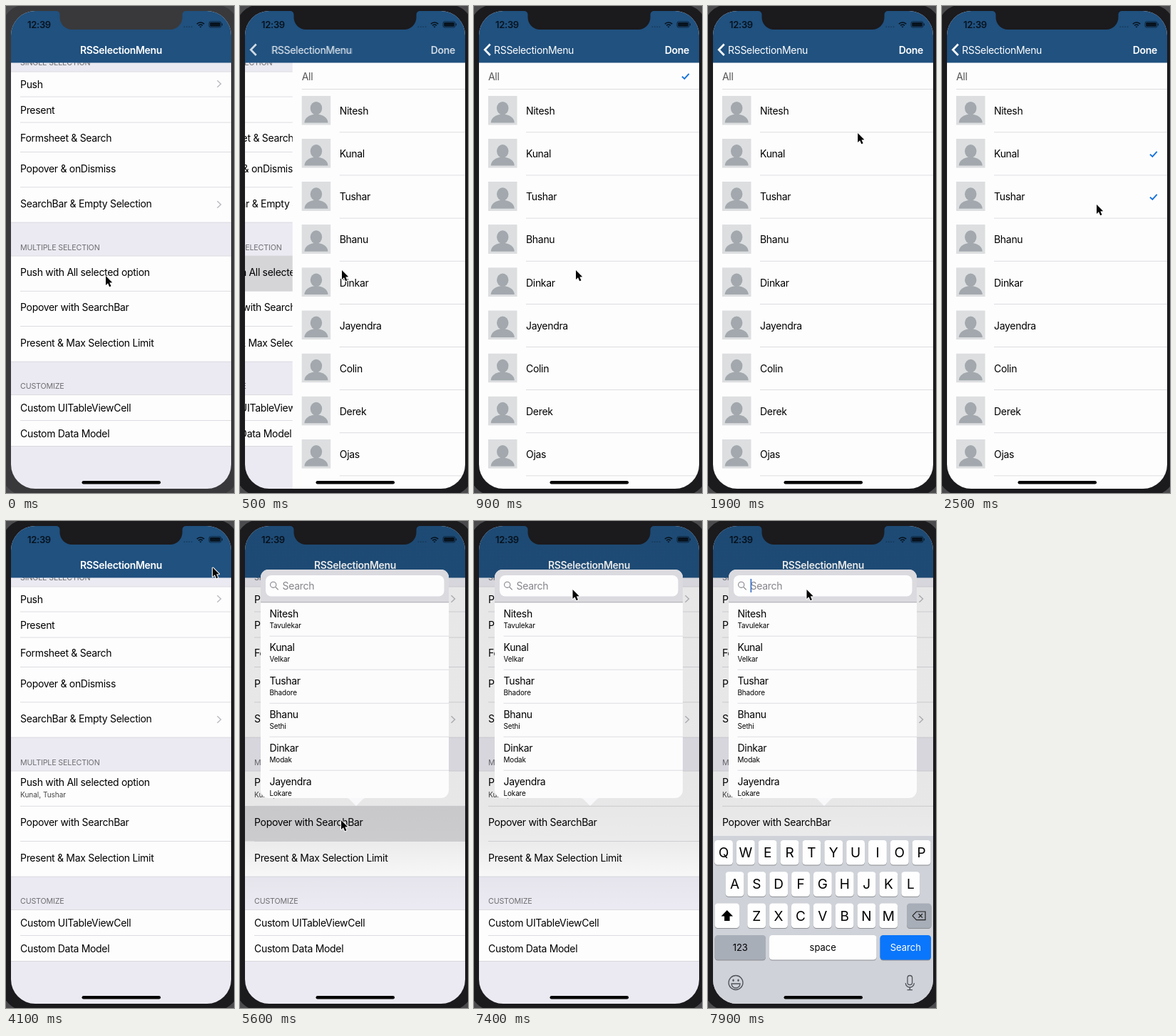
An HTML page with a canvas for the animation above (8000 ms loop, 320x682 px).

```html
<!DOCTYPE html>
<html lang="en">
<head>
<meta charset="utf-8">
<title>Selection menu demo</title>
<style>
html, body { margin: 0; width: 100%; height: 100%; overflow: hidden; background: #1b1a1d; }
canvas { display: block; width: 320px; height: 682px; }
</style>
</head>
<body>
<canvas id="stage"></canvas>
<script>
const W = 320, H = 682, LOOP = 8000, STEP = 100;
const SCREEN = { x: 7, y: 7, w: 309, h: 669 };
const NAV_BOTTOM = 79.5;
const FONT = 'Inter, Roboto, sans-serif';
const NAMES = ['Nitesh', 'Kunal', 'Tushar', 'Bhanu', 'Dinkar', 'Jayendra', 'Colin', 'Derek', 'Ojas'];
const SURNAMES = ['Tavulekar', 'Velkar', 'Bhadore', 'Sethi', 'Modak', 'Lokare'];

const canvas = document.getElementById('stage');
const ctx = canvas.getContext('2d');
const ratio = window.devicePixelRatio || 1;
canvas.width = W * ratio;
canvas.height = H * ratio;

const clamp = v => Math.min(1, Math.max(0, v));
const lerp = (a, b, u) => a + (b - a) * u;
const ramp = (t, start, end) => clamp((t - start) / (end - start));
const easeOut = u => 1 - (1 - u) ** 3;
const smooth = u => u * u * (3 - 2 * u);

function rect(x, y, w, h, color) {
  ctx.fillStyle = color;
  ctx.fillRect(x, y, w, h);
}

function rounded(x, y, w, h, r, color) {
  ctx.beginPath();
  ctx.roundRect(x, y, w, h, r);
  ctx.fillStyle = color;
  ctx.fill();
}

function stroke(points, color, width) {
  ctx.beginPath();
  points.forEach(([x, y]) => ctx.lineTo(x, y));
  ctx.strokeStyle = color;
  ctx.lineWidth = width;
  ctx.stroke();
}

function polygon(points, color) {
  ctx.beginPath();
  points.forEach(([x, y]) => ctx.lineTo(x, y));
  ctx.closePath();
  ctx.fillStyle = color;
  ctx.fill();
}

// y is the middle of the capital letters.
function label(str, x, y, { size = 14, color = '#000', weight = 400, align = 'left', track = -0.022 } = {}) {
  ctx.font = `${weight} ${size}px ${FONT}`;
  ctx.letterSpacing = `${size * track}px`;
  ctx.textAlign = align;
  ctx.fillStyle = color;
  ctx.fillText(str, x, y + size * 0.36);
}

function faded(alpha, draw) {
  if (alpha <= 0) return;
  ctx.save();
  ctx.globalAlpha *= alpha;
  draw();
  ctx.restore();
}

function shifted(dx, dy, draw) {
  ctx.save();
  ctx.translate(dx, dy);
  draw();
  ctx.restore();
}

const separator = (x, y, end = 316) => rect(x, y - 0.3, end - x, 0.7, '#d0cfd4');
const chevron = y => stroke([[296.5, y - 4.7], [301.5, y], [296.5, y + 4.7]], '#bcbcc2', 1.5);
const check = y => stroke([[292, y + 0.3], [295.4, y + 3.5], [301.7, y - 3.7]], '#1673dc', 1.9);

function section(title, y, edges, rows) {
  label(title, 20, y, { size: 10.7, color: '#6d6d72', track: -0.014 });
  const top = edges[0], bottom = edges[edges.length - 1];
  rect(7, top, 309, bottom - top, '#fdfdfe');
  edges.forEach((edge, i) => separator(i === 0 || edge === bottom ? 7 : 20, edge));
  rows.forEach(draw => draw());
}

function drawMenu(t) {
  const row = (str, y) => () => label(str, 20, y);
  const picked = t >= 3500;
  rect(7, 7, 309, 669, '#ebeaf2');

  section('SINGLE SELECTION', 79, [92, 127, 163, 204.3, 253.8, 303], [
    row('Push', 109.5), row('Present', 145.5), row('Formsheet & Search', 184.5),
    row('Popover & onDismiss', 227.5), row('SearchBar & Empty Selection', 277)
  ]);
  chevron(109);
  chevron(278);

  section('MULTIPLE SELECTION', 338, [350, 399.2, 448.5, 498], []);
  const pushGlow = t < 2000 ? ramp(t, 200, 300) : 1 - ramp(t, 3600, 4000);
  const popGlow = ramp(t, 5250, 5350) * (1 - ramp(t, 5700, 6000));
  faded(pushGlow, () => rect(7, 350, 309, 49, '#d5d5d8'));
  faded(popGlow, () => rect(7, 399, 309, 49.5, '#dbdbde'));
  label('Push with All selected option', 20, picked ? 366 : 372.5);
  if (picked) label(`${NAMES[1]}, ${NAMES[2]}`, 20, 383, { size: 10, color: '#444', track: 0 });
  label('Popover with SearchBar', 20, 422);
  label('Present & Max Selection Limit', 20, 471.5);

  section('CUSTOMIZE', 532.5, [544.3, 580.3, 616.3], [
    row('Custom UITableViewCell', 562.5), row('Custom Data Model', 599)
  ]);
}

function avatar(x, y) {
  ctx.save();
  ctx.beginPath();
  ctx.rect(x, y, 41, 41);
  ctx.clip();
  rect(x, y, 41, 41, '#dcdee0');
  ctx.fillStyle = '#a2a8ad';
  ctx.beginPath();
  ctx.ellipse(x + 20.5, y + 17.5, 8.2, 9.3, 0, 0, Math.PI * 2);
  ctx.fill();
  ctx.beginPath();
  ctx.ellipse(x + 20.5, y + 37.7, 16.5, 12, 0, Math.PI, 0);
  ctx.fill();
  ctx.restore();
}

function drawList(t) {
  rect(7, 7, 309, 669, '#fdfdfe');
  label('All', 20, 98.5, { color: '#555' });
  if (t < 1600) check(98.5);
  separator(20, 116.5);
  NAMES.forEach((name, i) => {
    const y = 147 + i * 60.13;
    avatar(19.7, y - 21.3);
    label(name, 73, y);
    separator(73, y + 29.8);
  });
  if (t >= 2100) check(207.5);
  if (t >= 2500) check(267.5);
}

function drawNav(p) {
  const title = 'RSSelectionMenu';
  rect(7, 7, 309, NAV_BOTTOM - 7, '#20517f');
  faded(1 - p, () => label(title, lerp(161.5, 84, p), 61.5, { weight: 600, color: '#fff', align: 'center' }));
  faded(p, () => {
    stroke([[22.7, 53.5], [15.2, 61.2], [22.7, 69]], '#fff', 2.7);
    label(title, lerp(104, 28, p), 61.5, { color: '#fff' });
    label('Done', 302, 61.5, { weight: 600, color: '#fff', align: 'right' });
  });
}

function drawStatus() {
  const ink = '#07131f';
  label('12:39', 30, 26, { size: 13, weight: 600, color: ink });
  for (let i = 0; i < 4; i++) rect(249.5 + i * 3.4, 28.5, 1.7, 1.5, '#173c5e');
  ctx.strokeStyle = ink;
  ctx.lineWidth = 1.7;
  for (const r of [3.9, 7]) {
    ctx.beginPath();
    ctx.arc(273, 30, r, -Math.PI * 0.76, -Math.PI * 0.24);
    ctx.stroke();
  }
  polygon([[271.3, 28.6], [274.7, 28.6], [273, 30.5]], ink);
  ctx.beginPath();
  ctx.roundRect(285, 21.8, 17, 8.2, 2.3);
  ctx.lineWidth = 0.7;
  ctx.stroke();
  rounded(286.2, 23, 14.6, 5.8, 1.3, ink);
  rect(302.8, 24.5, 1, 2.8, ink);
}

function drawDim() {
  const shade = ctx.createLinearGradient(0, 400, 0, 540);
  shade.addColorStop(0, 'rgba(0,0,0,0.085)');
  shade.addColorStop(0.35, 'rgba(0,0,0,0.07)');
  shade.addColorStop(0.7, 'rgba(0,0,0,0.025)');
  shade.addColorStop(1, 'rgba(0,0,0,0)');
  rect(7, 7, 309, 533, shade);
}

function drawPopover(t) {
  polygon([[147, 387], [153, 389], [163, 399], [173, 389], [179, 387]], '#f8f8fa');
  ctx.save();
  ctx.beginPath();
  ctx.roundRect(29, 68, 264, 320, 11);
  ctx.clip();
  rect(29, 68, 264, 320, '#fcfcfd');
  rect(29, 68, 264, 46, '#dbdadf');
  rect(29, 113.4, 264, 0.9, '#a5a5aa');
  rounded(36, 76, 250.5, 29.5, 8, '#fdfdfe');

  ctx.beginPath();
  ctx.arc(46.7, 89.3, 4.1, 0, Math.PI * 2);
  ctx.strokeStyle = '#85858b';
  ctx.lineWidth = 1.1;
  ctx.stroke();
  stroke([[49.7, 92.3], [53.7, 96.3]], '#85858b', 1.2);
  label('Search', 59.5, 90.7, { color: '#85858b' });
  if (t >= 7600) rect(59.5, 81, 1.7, 19, '#3d73c9');

  SURNAMES.forEach((surname, i) => {
    const y = 129.7 + i * 47;
    label(NAMES[i], 41.5, y);
    label(surname, 41.5, y + 16.5, { size: 9.9, track: -0.01 });
    separator(41.5, y + 31.4, 293);
  });
  ctx.restore();
}

function key(x, y, w, str, { fill = '#fefefe', color = '#000', size = 13 } = {}) {
  rounded(x, y + 1, w, 34.5, 4.2, '#8b8d92');
  rounded(x, y, w, 34.5, 4.2, fill);
  label(str, x + w / 2, y + 17.2, { size, color, align: 'center', track: 0 });
}

function drawKeyboard() {
  const GREY = '#a8aeb8', pitch = 30.85, ink = '#50545a';
  rect(7, 441, 309, 241, '#cfd2d8');
  [['QWERTYUIOP', 22, 447], ['ASDFGHJKL', 37.5, 491.2], ['ZXCVBNM', 68.2, 535.5]].forEach(([letters, x, y]) => {
    [...letters].forEach((ch, i) => key(x + i * pitch - 12.9, y, 25.8, ch, { size: 19 }));
  });

  key(9.5, 535.5, 34.5, '');
  polygon([[26.7, 545], [35, 553.5], [30.5, 553.5], [30.5, 560], [23, 560], [23, 553.5], [18.5, 553.5]], '#000');
  key(279, 535.5, 34.5, '', { fill: GREY });
  stroke([[287, 552.8], [292.5, 547], [305, 547], [305, 558.6], [292.5, 558.6], [287, 552.8]], '#222', 1.2);
  stroke([[295.5, 550], [301, 555.6]], '#222', 1.2);
  stroke([[301, 550], [295.5, 555.6]], '#222', 1.2);

  key(9.5, 580, 71.5, '123', { fill: GREY });
  key(86, 580, 150.5, 'space');
  key(241.5, 580, 71.5, 'Search', { fill: '#0a76fb', color: '#fff' });

  ctx.strokeStyle = ink;
  ctx.lineWidth = 1.3;
  ctx.beginPath();
  ctx.arc(39, 646.5, 10, 0, Math.PI * 2);
  ctx.stroke();
  ctx.beginPath();
  ctx.arc(39, 648, 6, 0, Math.PI);
  ctx.closePath();
  ctx.stroke();
  ctx.fillStyle = ink;
  for (const x of [35.5, 42.5]) {
    ctx.beginPath();
    ctx.ellipse(x, 643.2, 1.2, 1.8, 0, 0, Math.PI * 2);
    ctx.fill();
  }
  ctx.beginPath();
  ctx.roundRect(280, 636.5, 6.6, 13, 3.3);
  ctx.stroke();
  ctx.beginPath();
  ctx.arc(283.3, 647, 6, 0, Math.PI);
  ctx.stroke();
  stroke([[283.3, 653], [283.3, 656.5]], ink, 1.3);
  stroke([[279.5, 656.7], [287, 656.7]], ink, 1.3);
}

function drawNotch(color) {
  const left = 75.5, right = 247.5, top = 7, bottom = 33, ear = 5, r = 17;
  ctx.beginPath();
  ctx.moveTo(left - ear, top - 1);
  ctx.lineTo(left - ear, top);
  ctx.arcTo(left, top, left, top + ear, ear);
  ctx.arcTo(left, bottom, left + r, bottom, r);
  ctx.arcTo(right, bottom, right, bottom - r, r);
  ctx.arcTo(right, top, right + ear, top, ear);
  ctx.lineTo(right + ear, top - 1);
  ctx.fillStyle = color;
  ctx.fill();
}

const PATH = [
  [0, 140, 378], [100, 140, 378], [400, 143, 370], [1000, 143, 370],
  [1500, 205, 98], [1700, 205, 98], [2000, 212, 206], [2150, 212, 206],
  [2400, 217, 278], [2650, 217, 278], [3300, 290, 65], [4450, 290, 65],
  [5200, 142, 419], [6250, 142, 419], [6800, 138.5, 96], [LOOP, 138.5, 96]
];

function drawCursor(t) {
  const i = PATH.findIndex(point => point[0] > t);
  const [t0, x0, y0] = PATH[i - 1], [t1, x1, y1] = PATH[i];
  const u = smooth(ramp(t, t0, t1));
  shifted(lerp(x0, x1, u), lerp(y0, y1, u), () => {
    const arrow = [[0, 0], [0, 13], [3, 10.3], [5.2, 15.3], [7.5, 14.3], [5.3, 9.5], [9.2, 9.3]];
    ctx.lineJoin = 'round';
    stroke([...arrow, arrow[0]], '#fff', 2);
    polygon(arrow, '#050505');
    ctx.lineJoin = 'miter';
  });
}

function render(t) {
  const bezel = t < 100 ? '#39393b' : '#1b1a1d';
  const page = t < 2000 ? easeOut(ramp(t, 300, 800)) : 1 - easeOut(ramp(t, 3550, 4000));
  const popover = ramp(t, 5300, 5500);
  const keyboard = easeOut(ramp(t, 7540, 7880));

  ctx.setTransform(ratio, 0, 0, ratio, 0, 0);
  rect(0, 0, W, H, '#4b4b4d');
  rounded(-6, -2, 333, 688, 34, bezel);

  ctx.save();
  ctx.beginPath();
  ctx.roundRect(SCREEN.x, SCREEN.y, SCREEN.w, SCREEN.h, 34);
  ctx.clip();
  if (page < 1) shifted(-93 * page, 0, () => drawMenu(t));
  if (page > 0) shifted(309 * (1 - page), 0, () => drawList(t));
  drawNav(page);
  drawStatus();
  faded(popover, () => {
    drawDim();
    drawPopover(t);
  });
  if (keyboard > 0) shifted(0, 236 * (1 - keyboard), drawKeyboard);
  rounded(106.5, 665, 110.5, 4.4, 2.2, '#050505');
  ctx.restore();

  drawNotch(bezel);
  drawCursor(t);
}

function tick(now) {
  render(Math.floor((now % LOOP) / STEP) * STEP);
  requestAnimationFrame(tick);
}
render(0);
requestAnimationFrame(tick);
</script>
</body>
</html>
```
